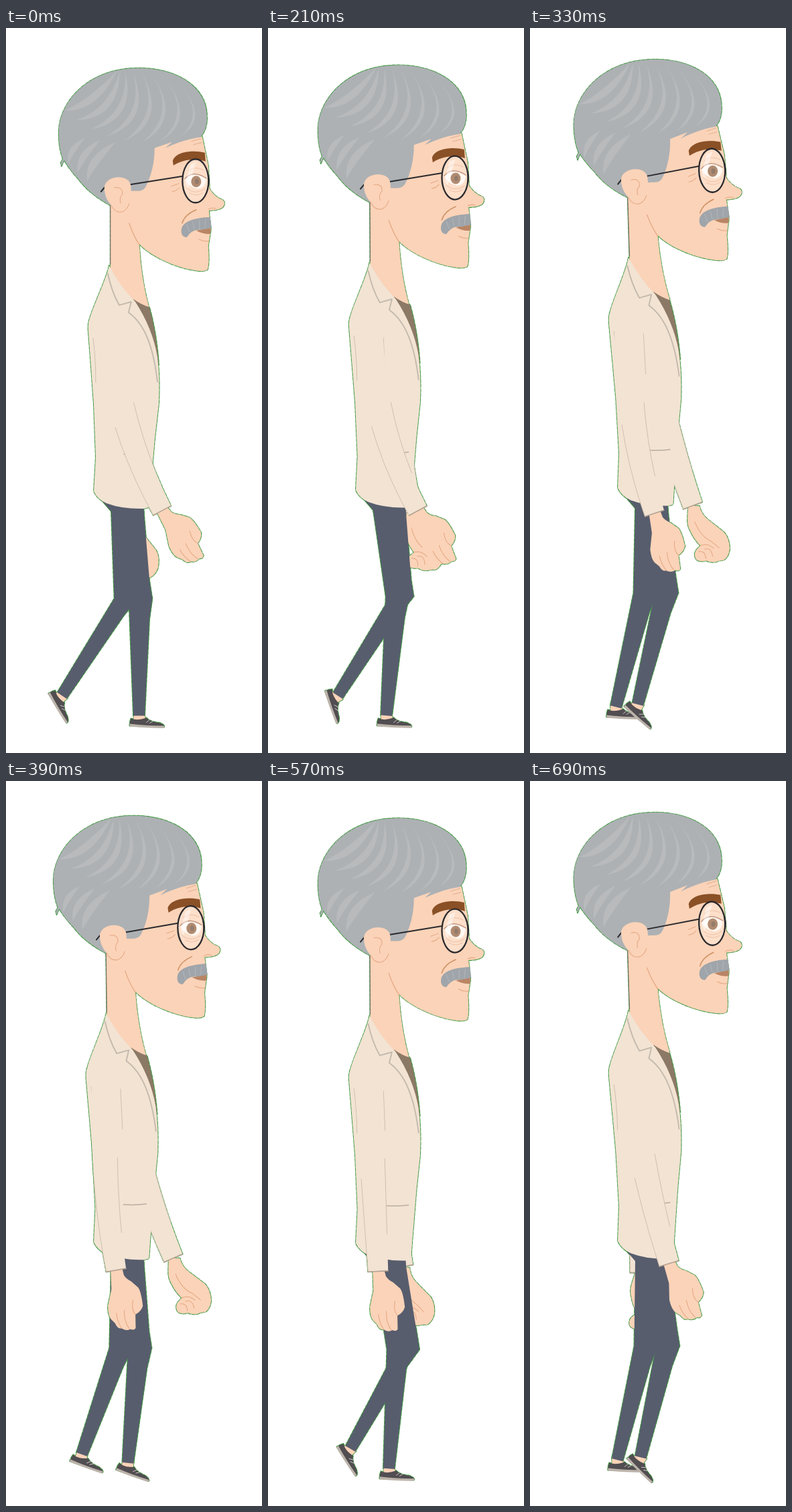
Write an HTML page with a canvas that moves like this. It is 382 px wide and 1080 px high and loops after 720 ms.

```html
<!DOCTYPE html>
<html lang="en">
<head>
<meta charset="utf-8">
<title>Walking man</title>
<style>
html, body { margin: 0; width: 100%; height: 100%; overflow: hidden; background: #fff; }
canvas { display: block; }
</style>
</head>
<body>
<canvas id="stage" width="382" height="1080"></canvas>
<script>
const ctx = document.getElementById('stage').getContext('2d');
const LOOP = 720, STEP = 30, HOLD = 120;
const SKIN = '#fbd3b8', CREASE = '#e3a783', CLOTH = '#f2e3d3', FOLD = '#cfc0af';
const DENIM = '#575d6d', HAIR = '#adb1b4', STRAND = '#b8babc', INK = '#2b2a2e';

const { sin, cos, max, hypot, PI } = Math;
const rad = deg => deg * PI / 180;
const mix = (a, b, k) => a + (b - a) * k;

let outline = false;

// ---- Motion: everything follows the stride angle q, one turn per two steps ----

function bodyAt(q) {
  const dy = -6.2 + 6.2 * cos(2 * q - rad(16));
  return { dx: dy * 0.88, dy, tilt: -1.7 * (dy / 12) ** 2, hem: dy * 0.4 };
}

function nearArmAt(q, body) {
  const c = cos(q), s = sin(q);
  return {
    ex: 157 + 11 * (c - s), ey: 596,
    cx: 194 + 42 * c - 3 * cos(2 * q), cy: 727 - 8 * c + body.dy / 2,
    angle: -14 - 14 * c
  };
}

function farArmAt(q) {
  const c = cos(q), s = sin(q);
  return {
    ex: 183 - 8 * c + 16 * s, ey: 595,
    cx: 208 - 25 * c + 34 * s + 5 * cos(2 * q), cy: 722 + 7 * c - 9 * s,
    angle: 10 + 6 * (c - s)
  };
}

// a is this leg's own angle: 0 at foot strike, half a turn at push-off.
function legAt(a, q, body) {
  const c = cos(a), s = sin(a), reach = 50 + 7.5 * cos(q);
  const ax = 146 - 5 * cos(q) - 3 * sin(q) + reach * c - 4 * s;
  const ay = 1009.5 + 15 * c + 6 * s;
  const bend = 27 - 15 * c - 13 * s + 7 * sin(2 * a);
  return {
    kx: mix(180, ax, 0.45) + bend, ky: 850 + body.dy * 0.7, ax, ay,
    angle: max(0, 19 + 42 * cos(a - rad(225))) * reach / 50
  };
}

// ---- Drawing helpers ----

const toPath = p => p instanceof Path2D ? p : new Path2D(p);

function poly(points) {
  const p = new Path2D();
  points.forEach(([x, y]) => p.lineTo(x, y));
  p.closePath();
  return p;
}

// Solid part: edge fringe in the first pass, colour in the second.
function part(shape, color) {
  const p = toPath(shape);
  if (outline) {
    ctx.strokeStyle = '#459a45';
    ctx.lineWidth = 2;
    ctx.setLineDash([5, 2]);
    ctx.stroke(p);
  } else {
    ctx.fillStyle = color;
    ctx.fill(p);
  }
}

function fill(shape, color) {
  if (!outline) part(shape, color);
}

function line(shape, color, width = 1) {
  if (outline) return;
  ctx.setLineDash([]);
  ctx.strokeStyle = color;
  ctx.lineWidth = width;
  ctx.stroke(toPath(shape));
}

function ellipse(x, y, rx, ry) {
  const p = new Path2D();
  p.ellipse(x, y, rx, ry, 0, 0, 2 * PI);
  return p;
}

function group(x, y, deg, draw) {
  ctx.save();
  ctx.translate(x, y);
  ctx.rotate(rad(deg));
  draw();
  ctx.restore();
}

// Crescent from one point to another, bowed through a control point.
function strand(x0, y0, cx, cy, x1, y1, w) {
  fill(`M${x0} ${y0}Q${cx} ${cy} ${x1} ${y1}Q${cx + w} ${cy + w} ${x0} ${y0}Z`, STRAND);
}

// ---- Head ----

function hair() {
  part(`M157 265C140 256 121 243 108 225C99 215 92 206 87 197L83 206L82 201L85 195
    C80 182 79 168 79 155C80 108 125 61 195 60C252 59 299 86 300 130C301 144 297 156 290 163
    C276 165 260 169 238 179L248 170L222 179C222 200 217 222 208 238Q204 243 198 243L180 243L150 238Z`, HAIR);
  for (let i = 0; i < 8; i++) {
    const k = i / 7;
    strand(166 + 90 * k ** 1.6, 64 + 16 * k ** 3, 120 + 180 * k ** 0.85, 128 - 18 * (1 - k) ** 6,
      88 + 172 * k ** 1.2, 123 + 48 * sin(k * PI * 0.7), 16 - 9 * k);
  }
  for (let i = 0; i < 3; i++) {
    strand(118 + 23 * i, 164 + 3 * i, 88 + 14 * i, 176 + 7 * i, 93 + 14 * i, 203 + 13 * i, 12 + 2.5 * i);
  }
}

function face() {
  part(`M156 230L156 395L202 430L214 418Q202 375 199 322C218 342 255 357 280 361Q296 364 301 360
    Q304 350 302 325L306 300L303 272C310 272 320 271 324 267Q329 260 323 256Q313 253 304 240
    L302 205L293 162L220 165Z`, SKIN);
  line('M156 264L156 352', '#6f655e');
  line('M184 291Q190 309 199 323', CREASE, 1.2);
  line('M277 169L291 165M280 174L292 171', '#dfb193');
  line('M247 236L258 232M248 244Q255 243 259 238', CREASE);
  line('M302 270Q307 267 313 269', CREASE);
}

function eye() {
  fill('M249 198C254 183 282 182 297 186L298 199C282 194 264 196 250 205Z', '#8a5026');
  fill('M267 226Q279 211 299 225Q298 239 286 240Q273 237 267 226Z', '#fffaf6');
  fill(ellipse(284, 229, 7.5, 8.5), '#85532f');
  fill(ellipse(285, 229, 3, 4), '#5a3a26');
  line('M267 225Q279 211 299 224', '#a5694a', 1.5);
  line('M270 239Q282 250 297 240M274 246Q284 252 294 246M272 213Q282 205 295 212', CREASE);
  fill(ellipse(283, 228, 19, 32), 'rgba(255,244,236,.35)');
  fill('M275 204L284 200L272 240L268 232Z', 'rgba(255,255,255,.45)');
  line(ellipse(283, 228, 19.5, 32.5), INK, 2.3);
  line('M264 221L182 234M142 244L147 238M302 220Q304 228 302 236', INK, 2);
}

function mouth() {
  line('M263 291Q267 278 284 271', '#cf9569', 1.5);
  fill('M284 302L306 298L305 307Q295 308 284 302Z', '#b98565');
  fill(`M262 300C264 289 279 283 305 282L307 298Q295 301 286 301Q276 302 270 312
    C263 312 261 306 262 300Z`, '#9fa5aa');
  line('M270 293L274 304M279 289L281 300M289 286L289 300M298 285L297 298', '#b3b7ba');
  line('M288 315Q295 319 303 318', CREASE);
}

function ear() {
  fill(`M147 238C148 220 181 217 186 233C188 244 187 256 182 265C176 277 163 277 157 264
    C150 256 147 248 147 238Z`, SKIN);
  line('M157 264Q163 277 174 274Q181 271 184 262', CREASE);
  line('M162 238Q175 236 174 248Q169 252 171 261', CREASE);
}

function head({ dx, dy, tilt }) {
  group(168 + dx, 247 + dy, tilt, () => {
    ctx.translate(-168, -247);
    face();
    hair();
    eye();
    mouth();
    ear();
  });
}

// ---- Body ----

// Lean: the hem stays nearly in place while the collar follows the head.
function lean({ dx, dy, hem }, x, y) {
  const k = (690 - y) / 336;
  return [x + dx * 0.65 * k, mix(y + hem, y + dy, k)];
}

function torso(body) {
  const [ox, oy] = lean(body, 0, 0), [sx, sy] = lean(body, 0, 1);
  ctx.save();
  ctx.transform(1, 0, sx - ox, sy - oy, ox, oy);
  part('M190 404Q203 413 214 416Q225 455 228 502L220 490Z', '#8b7966');
  part(`M154 354C150 374 130 415 125 433Q122 440 123 452L127 505L131 560L134 640L131 690
    Q136 702 150 708Q174 717 206 716L213 714L215 690L222 612L228 560Q230 520 226 490
    Q219 448 193 408Q170 385 154 354Z`, CLOTH);
  line('M152 366Q158 394 169 413L187 408L183 424C207 441 220 475 226 527', '#c2b8ac', 1.8);
  line('M130 462Q134 492 134 528M174 465L176 524', FOLD);
  line('M176 635Q195 636 210 634', '#b9aea2', 1.5);
  ctx.restore();
}

function sleeve([sx, sy], { ex, ey, cx, cy }) {
  const left = [], right = [], n = 10;
  for (let i = 0; i <= n; i++) {
    const t = i / n, u = 1 - t;
    const x = u * u * sx + 2 * u * t * ex + t * t * cx;
    const y = u * u * sy + 2 * u * t * ey + t * t * cy;
    const tx = mix(ex - sx, cx - ex, t), ty = mix(ey - sy, cy - ey, t);
    const w = (21 - 6 * t) / hypot(tx, ty);
    left.push([x - ty * w, y + tx * w]);
    right.push([x + ty * w, y - tx * w]);
  }
  part(poly([...left, ...right.slice().reverse()]), CLOTH);
  const edge = pts => 'M' + pts.map(p => p.join(' ')).join('L');
  line(edge(left.slice(5)), FOLD);
  line(edge(right.slice(4, 9)), FOLD);
  line(edge([left[n], right[n]]), '#b3a292', 1.6);
}

function nearHand({ cx, cy, angle }) {
  group(cx, cy, angle, () => {
    part(`M-8 -3L9 -3L11 8Q14 14 21 18L31 28Q35 34 36 56Q33 64 24 68L23 88Q21 92 15 89
      Q8 92 2 87Q-4 88 -7 79L-13 72Q-17 66 -16 52L-9 28Z`, SKIN);
    line('M2 87Q-4 76 -4 64M13 88Q6 76 8 60M24 68Q18 60 22 46', CREASE);
  });
}

function farHand({ cx, cy, angle }) {
  group(cx, cy, angle, () => {
    part(`M-7 0L10 0Q13 12 24 20L48 37Q57 46 58 62Q57 74 50 79Q42 80 39 82
      Q30 84 24 81Q14 84 9 80Q4 74 8 66L14 59Q4 50 -2 38Q-7 30 -7 20Z`, SKIN);
    line('M4 24Q14 46 30 52L42 61M14 59Q24 54 34 62M20 64Q30 60 33 74M12 68Q22 66 23 78', CREASE);
  });
}

function shoe({ ax, ay, angle }) {
  group(ax, ay, angle, () => {
    part('M-8 -5L8 -5L10 9L-8 9Z', SKIN);
    part('M-12 4Q-5 7 4 5L11 3Q17 9 28 10Q38 12 38 17L-14 15Q-14 9 -12 4Z', '#514d51');
    fill('M-14 12Q10 15 38 15L37 18.5Q10 18 -14 16Z', '#bcb3aa');
    line('M11 10L16 6M16 11L21 8', '#c9c4c0');
  });
}

function leg(pose, hem) {
  const { kx, ky, ax, ay } = pose, hip = 700 + hem;
  const w = 8.5 / hypot(ax - kx, ay - ky), nx = (ay - ky) * w, ny = (kx - ax) * w;
  shoe(pose);
  part(poly([[140, hip], [204, hip], [206, hip + 25], [kx + 14, ky - 25], [kx + 18, ky],
    [mix(kx, ax, 0.18) + 14, mix(ky, ay, 0.18)], [ax + nx, ay + ny], [ax - nx, ay - ny],
    [kx - 17, ky], [157, hip + 20]]), DENIM);
}

function man(t) {
  // The opening pose rests before the walk sets off.
  const q = 2 * PI * max(0, t - HOLD) / LOOP;
  const body = bodyAt(q), near = nearArmAt(q, body), far = farArmAt(q);
  const legs = [legAt(q, q, body), legAt(q + PI, q, body)].sort((a, b) => a.ax - b.ax);

  farHand(far);
  sleeve(lean(body, 175, 460), far);
  legs.forEach(l => leg(l, body.hem));
  head(body);
  torso(body);
  nearHand(near);
  sleeve(lean(body, 152, 450), near);
}

function frame() {
  const t = Math.floor(performance.now() % LOOP / STEP) * STEP;
  ctx.fillStyle = '#fff';
  ctx.fillRect(0, 0, 382, 1080);
  ctx.lineJoin = ctx.lineCap = 'round';
  for (outline of [true, false]) man(t);
  requestAnimationFrame(frame);
}
frame();
</script>
</body>
</html>
```
